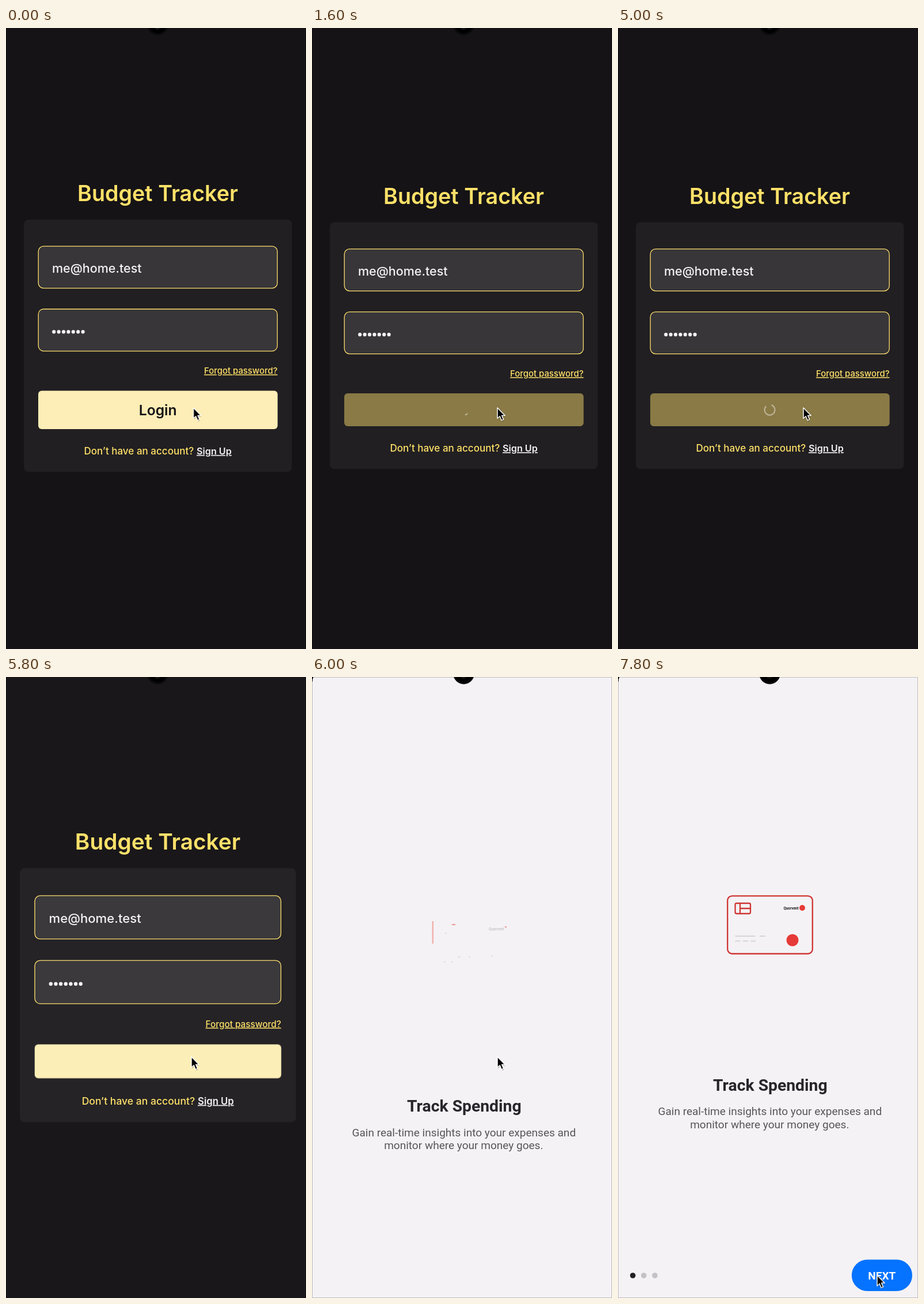
Recreate the animation shown at these times as an HTML page. Size 521 by 1076 pixels, loop 8000 ms.

```html
<!DOCTYPE html>
<html lang="en">
<head>
<meta charset="utf-8">
<title>Budget Tracker</title>
<style>
  html, body { margin: 0; width: 100%; height: 100%; overflow: hidden; background: #151316; }
  svg { display: block; width: 521px; height: 1076px; }
  text { font-family: Inter, "Noto Sans", sans-serif; font-weight: 500; }
  .intro text { font-family: Roboto, "Liberation Sans", sans-serif; font-weight: 400; }
  .gold { fill: #ffe168; }
  .pale { fill: #f4f2f6; }
  .mid { text-anchor: middle; }
  .link { text-decoration: underline; text-underline-offset: 2px; text-decoration-thickness: 1px; }
  .field { fill: #383638; stroke: #ffe06e; stroke-width: 1.3; }

  /* Hard changes on the shared 8 s clock */
  .step { animation: 8s step-end infinite; }
  .upper { animation-name: upper; }
  .lower { animation-name: lower; }
  .panel { animation-name: panel; fill: #211f22; }
  .button { animation-name: button; }
  .label { animation-name: label; }
  .busy { animation-name: busy; }
  .login { animation-name: zoom; transform-origin: 263px 515px; }
  .intro { animation-name: appear; }
  .grow { animation-name: grow; transform-origin: 263px 515px; }
  .content { animation-name: settle; }
  .sketch { animation-name: sketch; }
  .footer { animation-name: footer; }

  @keyframes upper { 0% { transform: translateY(-4.8px); } 3.75%, 100% { transform: none; } }
  @keyframes lower { 0% { transform: translateY(4.8px); } 3.75%, 100% { transform: none; } }
  @keyframes panel {
    0% { y: 332px; height: 437px; }
    3.75%, 100% { y: 336.5px; height: 427.5px; }
  }
  @keyframes button {
    0% { y: 628.5px; height: 66.5px; fill: #fceeb6; }
    3.75% { y: 633px; height: 57px; fill: #897a46; }
    72.5%, 100% { y: 633px; height: 57px; fill: #fceeb6; }
  }
  @keyframes label { 0% { opacity: 1; } 3.75%, 100% { opacity: 0; } }
  @keyframes busy { 0% { opacity: 0; } 3.75% { opacity: 1; } 72.5%, 100% { opacity: 0; } }
  @keyframes zoom { 0% { transform: none; } 72.5% { transform: scale(1.03); } 73.75%, 100% { transform: scale(1.113); } }
  @keyframes appear { 0% { opacity: 0; } 72.5% { opacity: .02; } 73.75% { opacity: .13; } 75%, 100% { opacity: 1; } }
  @keyframes grow {
    0% { opacity: 0; transform: scale(.93); }
    73.75% { opacity: .4; transform: scale(.965); }
    75%, 100% { opacity: 1; transform: none; }
  }
  @keyframes settle { 0% { transform: translateY(36.5px); } 80%, 100% { transform: none; } }
  @keyframes sketch { 0% { opacity: 0; } 75% { opacity: 1; } 76.25%, 100% { opacity: 0; } }
  @keyframes footer { 0% { opacity: 0; } 80%, 100% { opacity: 1; } }

  .card { animation: card 8s infinite; }
  @keyframes card {
    0%, 76.25% { opacity: 0; transform: translateX(18px); }
    82.5%, 100% { opacity: 1; transform: none; }
  }

  .pointer { animation: pointer 8s linear infinite; }
  @keyframes pointer {
    0%, 1.25% { transform: translate(325.5px, 658px); }
    5% { transform: translate(322px, 658px); }
    82% { transform: translate(322px, 658px); animation-timing-function: ease-in-out; }
    89%, 100% { transform: translate(450px, 1036.5px); }
  }

  /* Six spinner cycles per loop */
  .orbit { animation: orbit 8s linear infinite; }
  .drift { animation: drift calc(8s / 6) -973ms linear infinite; }
  .arc {
    fill: none; stroke: #c6bca3; stroke-width: 2; stroke-linecap: square;
    animation: arc calc(8s / 6) -973ms cubic-bezier(.4, 0, .2, 1) infinite;
  }
  @keyframes orbit { from { transform: rotate(-199deg); } to { transform: rotate(1097deg); } }
  @keyframes drift { to { transform: rotate(90deg); } }
  @keyframes arc {
    0% { stroke-dasharray: 4 96; stroke-dashoffset: 0; }
    50% { stroke-dasharray: 79 21; stroke-dashoffset: 0; }
    100% { stroke-dasharray: 4 96; stroke-dashoffset: -75; }
  }
</style>
</head>
<body>
<svg viewBox="0 0 521 1076">
  <defs>
    <path id="arrow" d="M0 0V18.5L4.2 14.7 7.2 21.8 10.6 20.4 7.6 13.5H13.2Z"/>
  </defs>
  <rect width="521" height="1076" fill="#151316"/>
  <path d="M.5 0V1076M520.5 0V1076" stroke="#0c0b0d"/>

  <g class="step login">
    <rect class="step panel" x="31" width="465.5" rx="8"/>
    <g class="step upper">
      <text class="gold mid" x="263.5" y="305" font-size="37.7" style="font-weight:600">Budget Tracker</text>
      <rect class="field" x="56.2" y="382.9" width="415" height="72.8" rx="9"/>
      <text class="pale" x="80" y="428.5" font-size="21.5">me@home.test</text>
      <rect class="field" x="56.2" y="491.8" width="415" height="72.8" rx="9"/>
      <path d="M83.2 531.2h51" stroke="#f4f2f6" stroke-width="6.2" stroke-linecap="round" stroke-dasharray="0 8.4"/>
      <text class="gold link" x="471.5" y="604" font-size="14.9" text-anchor="end">Forgot password?</text>
    </g>
    <rect class="step button" x="56" width="415.7" rx="6"/>
    <text class="step label mid" x="263.7" y="671" font-size="24.7" fill="#151316" style="font-weight:600">Login</text>
    <g class="step busy">
      <g transform="translate(263.5 661.7)">
        <g class="orbit"><g class="drift"><circle class="arc" r="9" pathLength="100"/></g></g>
      </g>
    </g>
    <g class="step lower">
      <text class="gold" x="135.5" y="734" font-size="17.05">Don’t have an account?</text>
      <text class="pale link" x="331" y="734" font-size="16.2" style="font-weight:600">Sign Up</text>
    </g>
  </g>

  <g class="step intro">
    <rect width="521" height="1076" fill="#f4f2f5"/>
    <rect x=".5" y=".5" width="520" height="1075" fill="none" stroke="#bdbbbf"/>
    <path d="M0 0H2.5Q.8 3 .8 8H0Z"/>
    <g class="step grow">
      <g class="step content">
        <g class="step sketch">
          <path d="M209.8 386.5v39" stroke="#f3b0ab" stroke-width="2.5"/>
          <path d="M243 393q3-1.5 6 0" stroke="#ec9a95" stroke-width="2" fill="none"/>
          <path d="M231 407.5h3M253 448.5h5M272 448.5h3M311 447h3M229 457h3M242 457h3" stroke="#d9d7dc" stroke-width="1.5"/>
          <text x="307" y="402" font-size="6.5" fill="#b5b3b8">Quorvent</text>
          <circle cx="336.5" cy="396.5" r="1.5" fill="#ec9a95"/>
        </g>
        <g class="card">
          <g fill="none" stroke="#cf3634" stroke-width="2.3">
            <rect x="190.2" y="379.3" width="147.6" height="100.2" rx="8"/>
            <rect x="203.5" y="392" width="26.5" height="18" rx="2.5"/>
            <path d="M212 392v18M212 401h18"/>
          </g>
          <path d="M203.5 449h35M246 449h10M203.5 457.5h9M217 457.5h9M230 457.5h9" stroke="#d6d4d9" stroke-width="2.2"/>
          <text x="287.5" y="402.5" font-size="6.3" fill="#1c1b1e" style="font-weight:700">Quorvent</text>
          <circle cx="320" cy="400" r="5" fill="#e63a38"/>
          <circle cx="303" cy="456" r="10.5" fill="#e63a38"/>
        </g>
        <text class="mid" x="264.3" y="716.5" font-size="28.3" fill="#28262b" style="font-weight:700">Track Spending</text>
        <g class="mid" font-size="19.05" fill="#58555b">
          <text x="263.8" y="759">Gain real-time insights into your expenses and</text>
          <text x="263.3" y="781.5">monitor where your money goes.</text>
        </g>
      </g>
    </g>
    <g class="step footer">
      <circle cx="25.7" cy="1037" r="4.8" fill="#222025"/>
      <g fill="#c4c2c7"><circle cx="44.8" cy="1037" r="4.8"/><circle cx="64" cy="1037" r="4.8"/></g>
      <rect x="405.8" y="1009.5" width="105.2" height="54.5" rx="27.2" fill="#0573ff"/>
      <text class="mid" x="458.3" y="1044.3" font-size="19" fill="#fff" style="font-weight:700">NEXT</text>
    </g>
  </g>

  <circle cx="263.5" cy="-6" r="18.4" fill="#0a090b"/>
  <circle cx="263.5" cy="-6" r="15" fill="#000"/>
  <circle cx="263" cy="-2" r="5" fill="#171618"/>

  <g class="pointer">
    <use href="#arrow" x=".8" y="2" opacity=".25"/>
    <use href="#arrow" stroke="#fff" stroke-width="1.4" stroke-linejoin="round"/>
  </g>
</svg>
</body>
</html>
```
